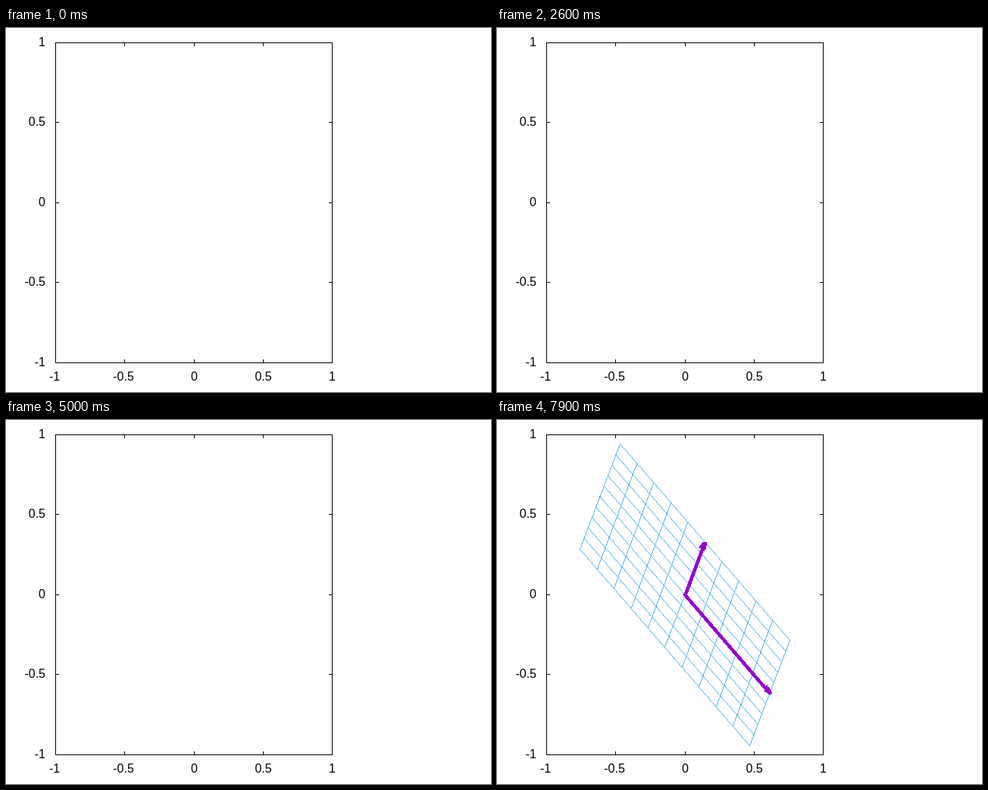
Write an HTML page with a canvas that moves like this. It is 640x480 px and loops after 8000 ms.

```html
<!DOCTYPE html>
<html lang="en">
<head>
<meta charset="utf-8">
<title>Linear map of a grid</title>
<style>
  html, body { margin: 0; width: 100%; height: 100%; overflow: hidden; background: #fff; }
  canvas, svg { position: absolute; left: 0; top: 0; width: 640px; height: 480px; }
  text { font: 16px "Liberation Sans", Arial, sans-serif; fill: #000; }
  path { fill: none; stroke: #000; shape-rendering: crispEdges; }
</style>
</head>
<body>
<canvas id="stage" width="640" height="480"></canvas>
<svg id="axes" viewBox="0 0 640 480"></svg>
<script>
const LOOP = 8000, TICK = 100, FIRST = 3;
const LEFT = 65, RIGHT = 430, TOP = 19, BOTTOM = 441;
const RATE = 0.0068 / 6;
const GRID = '#56b4e9', ARROW = '#9400d3';
const ctx = document.getElementById('stage').getContext('2d');

const toX = v => Math.round((LEFT + RIGHT) / 2 + v * (RIGHT - LEFT) / 2);
const toY = v => Math.round((TOP + BOTTOM) / 2 - v * (BOTTOM - TOP) / 2);

function drawAxes() {
  let d = `M${LEFT}.5 ${TOP}.5H${RIGHT}.5V${BOTTOM}.5H${LEFT}.5Z`;
  let labels = '';
  for (const v of [-1, -0.5, 0, 0.5, 1]) {
    const x = toX(v), y = Math.floor(230 - v * 211);
    if (Math.abs(v) < 1) {
      d += `M${x}.5 ${TOP}v5M${x}.5 ${BOTTOM + 1}v-5M${LEFT} ${y}.5h5M${RIGHT + 1} ${y}.5h-5`;
    }
    labels += `<text x="52" y="${y + 5}" text-anchor="end">${v}</text>` +
      `<text x="${x + (v < 0 ? -1 : 0.5)}" y="465" text-anchor="middle">${v}</text>`;
  }
  document.getElementById('axes').innerHTML = `<path d="${d}"/>${labels}`;
}

// Hard-edged line made of horizontal or vertical spans
function line([x1, y1], [x2, y2], width = 1) {
  const dx = x2 - x1, dy = y2 - y1;
  const steps = Math.max(Math.abs(dx), Math.abs(dy)) || 1;
  const span = Math.max(1, Math.floor(width * Math.hypot(dx, dy) / steps));
  const steep = Math.abs(dy) > Math.abs(dx), half = span >> 1;
  for (let i = 0; i <= steps; i++) {
    const x = Math.round(x1 + dx * i / steps), y = Math.round(y1 + dy * i / steps);
    if (steep) ctx.fillRect(x - half, y, span, 1);
    else ctx.fillRect(x, y - half, 1, span);
  }
}

function arrow(from, to) {
  const width = 5, head = 9, spread = Math.PI / 12;
  const back = Math.atan2(from[1] - to[1], from[0] - to[0]);
  const barb = angle => [
    Math.round(to[0] + head * Math.cos(back + angle)),
    Math.round(to[1] + head * Math.sin(back + angle))
  ];
  const a = barb(spread), b = barb(-spread);
  line(from, to, width);
  line(a, to, width);
  line(b, to, width);
  line(a, b, width);
}

function drawGrid(n) {
  const k = n * RATE;
  const a = [0.7 - 2 * k, -0.7 + 2 * k], b = [0.1 + k, 0.5 - 4 * k];
  const map = (u, v) => [toX(u * a[0] + v * b[0]), toY(u * a[1] + v * b[1])];
  ctx.fillStyle = GRID;
  for (let i = -5; i <= 5; i++) {
    line(map(i / 5, -1), map(i / 5, 1));
    line(map(-1, i / 5), map(1, i / 5));
  }
  ctx.fillStyle = ARROW;
  arrow(map(0, 0), map(1, 0));
  arrow(map(0, 0), map(0, 1));
}

let shown = -1;
function render(now) {
  const tick = Math.floor((now % LOOP) / TICK);
  if (tick !== shown) {
    shown = tick;
    ctx.clearRect(0, 0, 640, 480);
    // The grid flashes on every second tick
    if (tick >= FIRST && tick % 2) drawGrid((tick - FIRST) / 2);
  }
}

drawAxes();
const start = performance.now();
function loop() {
  render(performance.now() - start);
  requestAnimationFrame(loop);
}
loop();
</script>
</body>
</html>
```
